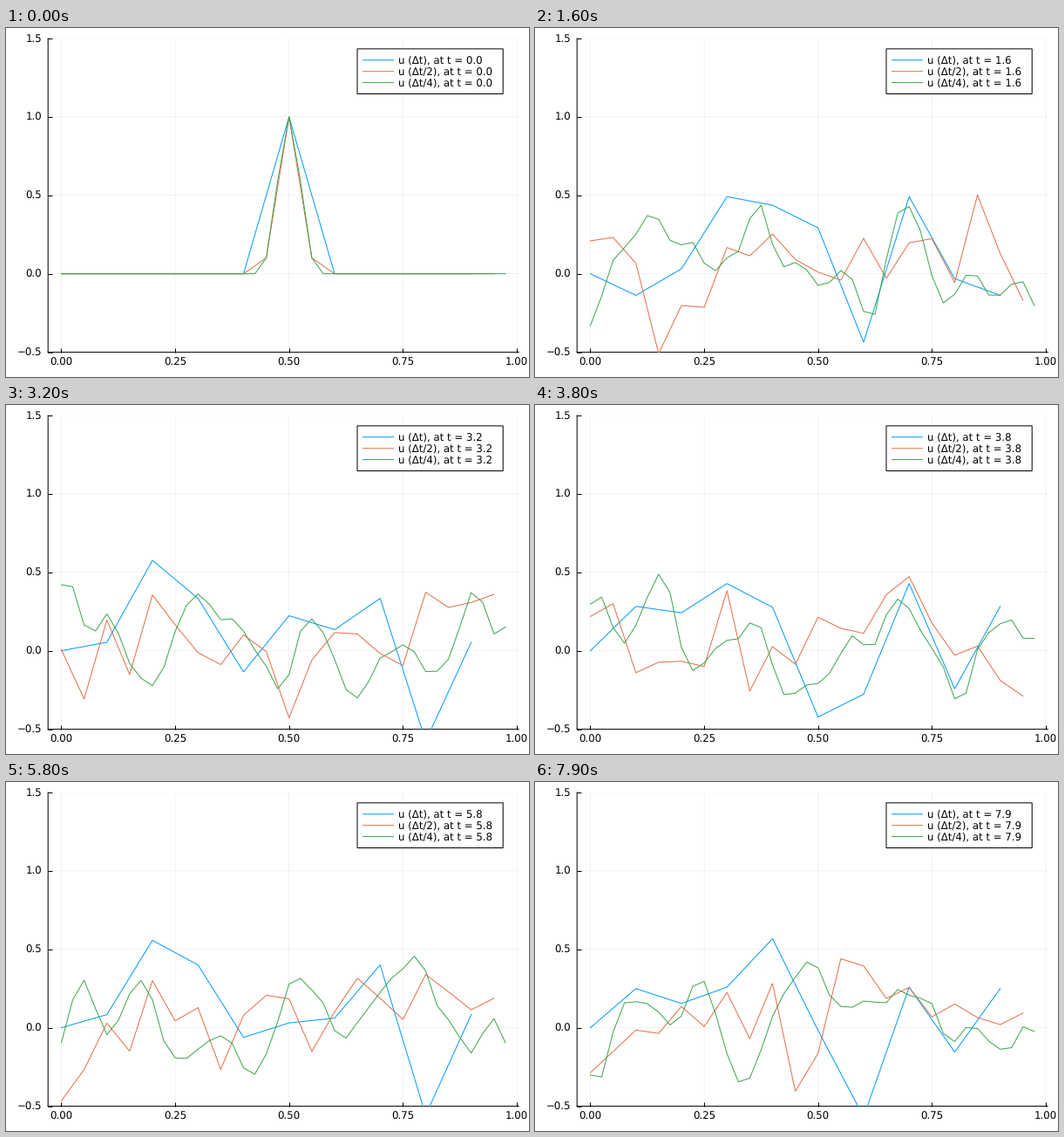
Write a matplotlib script that moves like this. It is 600 by 400 pixels and loops after 8000 ms.

```python
import numpy as np
import matplotlib.pyplot as plt
from matplotlib.animation import FuncAnimation
from matplotlib.patches import Rectangle

W, H, DPI = 600, 400, 100
PX = 72 / DPI
FRAMES, STEP_MS = 80, 100
LEFT, RIGHT, TOP, BOTTOM = 48.2, 588.2, 11.9, 371.6
XLIM, YLIM = (-0.02925, 1.00425), (-0.5, 1.5)
ROW = 12.9  # legend row height

plt.rcParams.update({
    "font.family": "DejaVu Sans",
    "font.size": 11.82 * PX,
    "text.hinting": "none",
    "path.snap": False,
})

# points, Courant number, colour, legend name
RUNS = [
    (10, 0.347, "#009AFA", "\u0394t"),
    (20, 0.337, "#E36F47", "\u0394t/2"),
    (40, 0.349, "#3EA44E", "\u0394t/4"),
]
SPEED = 3.0  # trips round the periodic domain per animation step


def bump(x):
    """Cubic spline pulse centred at 0.5."""
    s = 25.2 * np.abs(x - 0.5)
    inner = 1 - 1.5 * s**2 + 0.75 * s**3
    outer = 0.25 * np.clip(2 - s, 0, None) ** 3
    return np.where(s <= 1, inner, outer)


def make_solver(n, courant):
    """Advection with central differences and RK4, solved mode by mode."""
    start = np.fft.fft(bump(np.arange(n) / n))
    w = -1j * courant * np.sin(2 * np.pi * np.fft.fftfreq(n))
    log_gain = np.log(1 + w + w**2 / 2 + w**3 / 6 + w**4 / 24)
    steps = SPEED * n / courant
    return lambda i: np.fft.ifft(start * np.exp(log_gain * steps * i)).real


fig = plt.figure(figsize=(W / DPI, H / DPI), dpi=DPI, facecolor="white")
ax = fig.add_axes([LEFT / W, 1 - BOTTOM / H, (RIGHT - LEFT) / W, (BOTTOM - TOP) / H])
ax.set(xlim=XLIM, ylim=YLIM, xticks=np.arange(5) / 4, yticks=np.arange(-1, 4) / 2)
ax.spines[["top", "right"]].set_visible(False)
ax.spines[["left", "bottom"]].set_linewidth(PX)
ax.tick_params(direction="in", length=5 * PX, width=PX,
               labelleft=False, labelbottom=False)
ax.set_axisbelow(True)
ax.grid(color="black", alpha=0.1, linewidth=0.5 * PX)

# Overlay in pixel coordinates, y downwards
top = fig.add_axes([0, 0, 1, 1])
top.set(xlim=(0, W), ylim=(H, 0))
top.axis("off")


def label(x, y, text, ha):
    return top.text(x, y, text, ha=ha, va="baseline", zorder=5)


for v in np.arange(5) / 4:
    x = LEFT + (v - XLIM[0]) / (XLIM[1] - XLIM[0]) * (RIGHT - LEFT)
    label(x, 387.2, f"{v:.2f}", "center")
for v in np.arange(-1, 4) / 2:
    y = BOTTOM - (v - YLIM[0]) / (YLIM[1] - YLIM[0]) * (BOTTOM - TOP)
    label(41, y + 4.3, f"{v:.1f}".replace("-", "\u2212"), "right")

# Legend, inset by a thirtieth of the plot size
box_right = RIGHT - (RIGHT - LEFT) / 30
box_top = TOP + (BOTTOM - TOP) / 30
top.add_patch(Rectangle((403, box_top), box_right - 403, 4 * ROW, facecolor="white",
                        edgecolor="black", linewidth=PX, zorder=3))

curves = []
for row, (n, courant, color, name) in enumerate(RUNS):
    y = box_top + ROW * (row + 1)
    line, = ax.plot(np.arange(n) / n, np.zeros(n), color=color,
                    linewidth=PX, zorder=3 + row)
    top.plot([409, 445], [y, y], color=color, linewidth=PX, zorder=4,
             solid_capstyle="butt")
    curves.append((line, label(450, y + 4, "", "left"), name,
                   make_solver(n, courant)))


def draw(i):
    for line, text, name, solve in curves:
        line.set_ydata(solve(i))
        text.set_text(f"u ({name}), at t = {i / 10:.1f}")
    return [item for c in curves for item in c[:2]]


anim = FuncAnimation(fig, draw, frames=FRAMES, interval=STEP_MS,
                     repeat=True, repeat_delay=0, blit=False)
plt.show()
```
